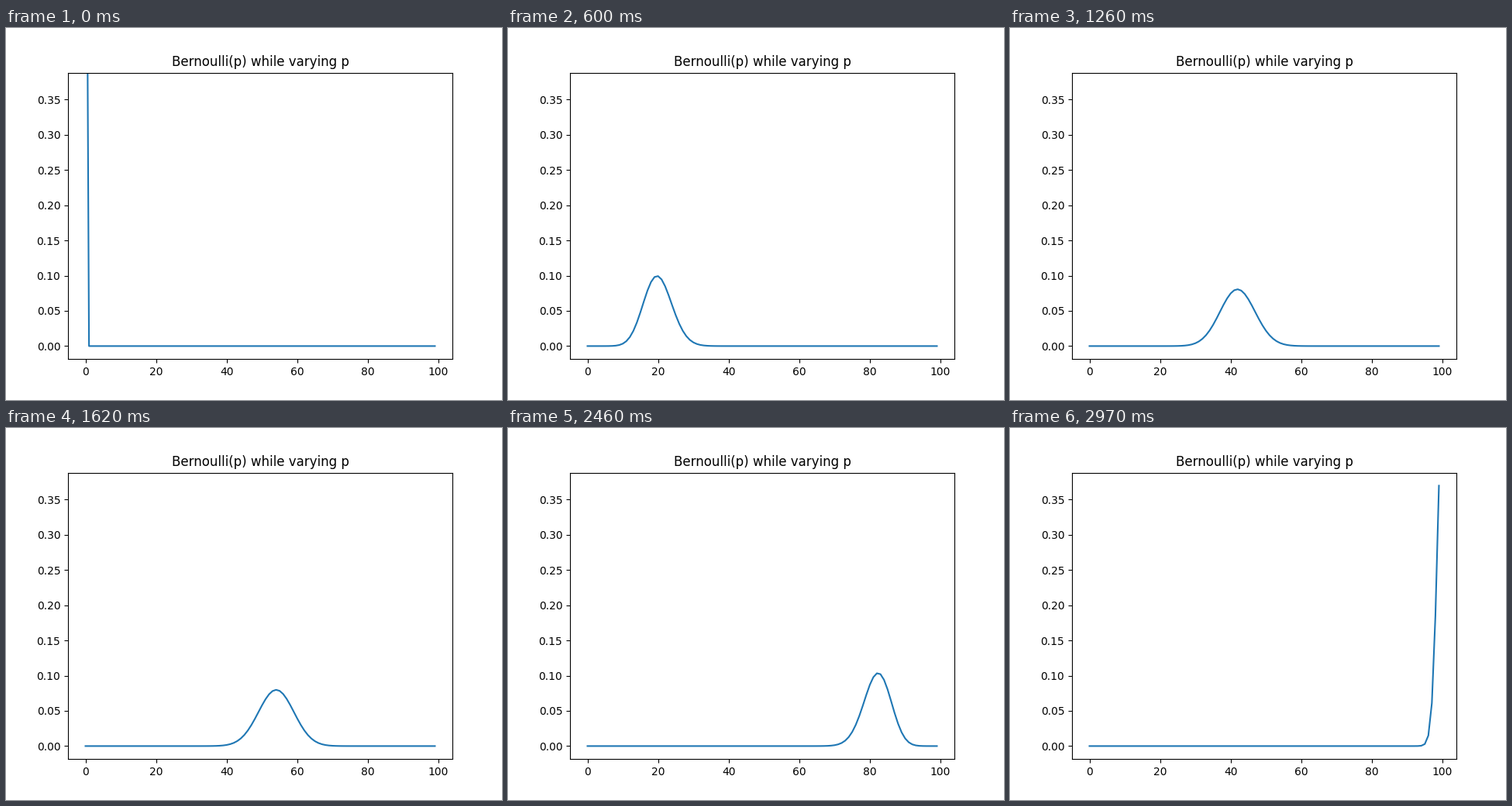
Write a matplotlib script that moves like this. It is 640 by 480 pixels and loops after 3 s.

```python
from math import comb

import matplotlib.pyplot as plt
import numpy as np
from matplotlib.animation import FuncAnimation

N = 100
INTERVAL = 30  # ms

k = np.arange(N)
coeffs = np.array([float(comb(N, j)) for j in k])


def pmf(p):
    """Probability of k successes in N trials."""
    return coeffs * p**k * (1 - p) ** (N - k)


def padded(values, margin=0.05):
    lo, hi = values.min(), values.max()
    pad = margin * (hi - lo)
    return lo - pad, hi + pad


fig, ax = plt.subplots(figsize=(6.4, 4.8), dpi=100)
ax.set_title("Bernoulli(p) while varying p")
line, = ax.plot(k, pmf(0.0))
ax.set_xlim(*padded(k))
ax.set_ylim(*padded(pmf((N - 1) / N)))


def update(i):
    line.set_ydata(pmf(i / N))
    return line,


anim = FuncAnimation(fig, update, frames=N, interval=INTERVAL, repeat=True)
plt.show()
```
